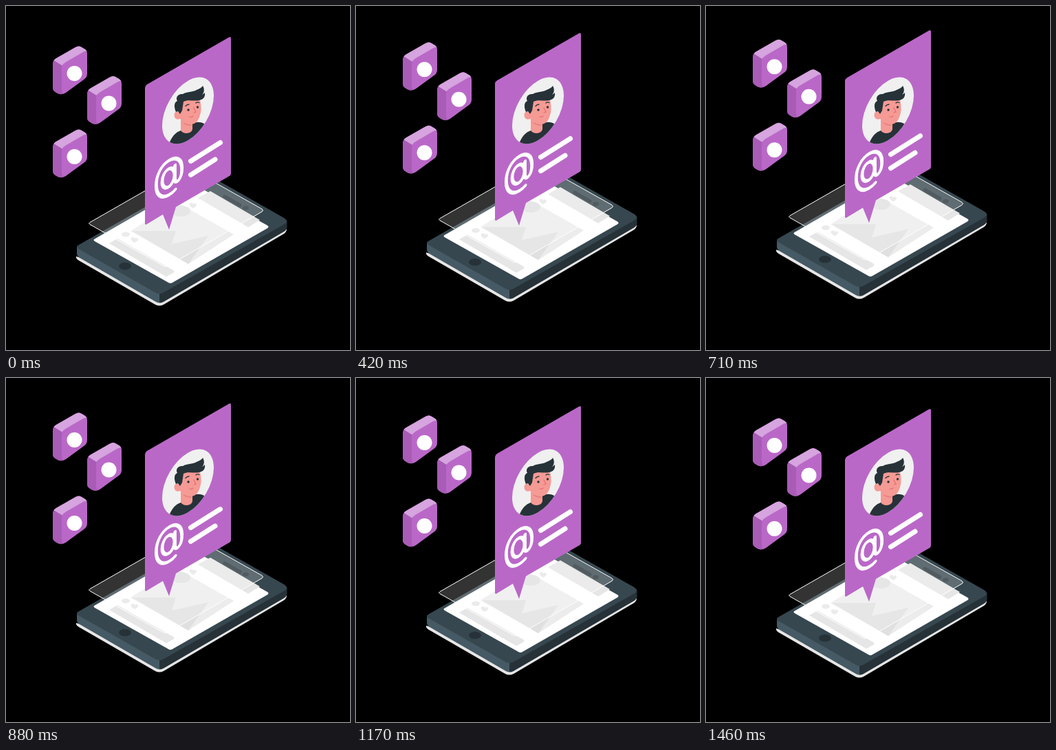
Animation, 500 px wide and 500 px high, one loop 1500 ms. Source, as an HTML page:

```html
<!DOCTYPE html>
<html lang="en">
<head>
<meta charset="utf-8">
<style>
  html, body { margin: 0; width: 100%; height: 100%; overflow: hidden; background: #000; }
  svg { display: block; width: 100vw; height: 100vh; }
</style>
</head>
<body>
<svg viewBox="0 0 500 500">
  <defs>
    <g id="tile">
      <path fill="#ba68c8" d="M68 85Q68 79 73 76L101 60Q106 57 110 60L115 63Q118 65 118 70V98Q118 104 113 107L87 126Q81 130 75 127L71 124.500Q68 122.500 68 118Z"/>
      <path fill="#a85cb6" d="M68 85Q68 81 70 78.500L82 85.500Q81 88 81 91V122Q81 126 83.500 127.500Q79 129 75 127L71 124.500Q68 122.500 68 118Z"/>
      <path fill="#d6a4de" d="M69.500 79Q71 77 73 76L101 60Q106 57 110 60L115 63Q117 64.500 117.500 66.500Q115.500 65 112 67L87 81.500Q83 84 81.500 86.500Z"/>
      <circle cx="99.500" cy="98" r="11" fill="#fff"/>
    </g>
    <path id="heart" d="M0 4C-5 1-6-1-5-3C-3-5 0-4 0-2C2-4 5-3 5-1C5 1 2 3 0 4Z"/>
    <clipPath id="portrait"><circle r="43.300" transform="matrix(.866 -.5 0 1 264.500 152)"/></clipPath>
  </defs>

  <g id="float">
    <use href="#tile"/>
    <use href="#tile" x="50" y="43.500"/>
    <use href="#tile" y="121"/>

    <!-- phone -->
    <path fill="#e6e6e6" d="M102 364Q101 367 106 370L217 434Q223 437 229 434L404 331Q408 328 408 324L223 400Z"/>
    <path fill="#455a64" d="M103 350V360Q103 363 107 366L217 429.500Q220 431.500 223 431.500V417Z"/>
    <path fill="#263238" d="M223 417V431.500Q226 431.500 229 430L404 328Q408.500 325 408.500 321V312Z"/>
    <path fill="#37474f" d="M107 346.500L285 245Q289 243 293 245L404 308Q412 313 404 317.500L229 416.500Q223 420 217 416.500L107 354Q99 350 107 346.500Z"/>
    <ellipse cx="173" cy="378" rx="9" ry="5.200" fill="#263238"/>
    <path stroke="#263238" stroke-width="5" stroke-linecap="round" d="M318 277L340 289.500"/>
    <ellipse cx="348.500" cy="293.500" rx="4.500" ry="3" fill="#263238"/>

    <!-- screen -->
    <path fill="#fff" d="M129 338.500L267 259Q270 257 273 259L380 319Q383 321 380 323L242 402Q239 404 236 402L129 342Q126 340 129 338.500Z"/>
    <g fill="#e6e6e6">
      <path d="M150 345L162 338L243 384Q246 386 243 388L233 393.500Z"/>
      <path d="M279 279L297 269L369 311L352 321.500Z"/>
      <path fill="#ececec" d="M181 327L248 285L331 332L265 375Z"/>
      <path fill="#e0e0e0" d="M183 327L247 327L241 346L294 334L265 375Z"/>
      <ellipse cx="254" cy="298" rx="14" ry="8" fill="#e0e0e0"/>
      <ellipse cx="174" cy="332" rx="6" ry="3.500"/>
      <use href="#heart" x="187" y="340"/>
      <use href="#heart" x="272" y="290"/>
    </g>
    <path fill="#fff" fill-opacity=".2" stroke="#fff" stroke-width="1" d="M122 314.500L260 235.500Q263 234 266 235.500L372 295Q375 297 372 299L236 377.500Q232 380 228 377.500L122 317.500Q119 316 122 314.500Z"/>

    <!-- card -->
    <path fill="#ba68c8" d="M202 119Q202 116 205 114L324 45.500Q327 44 327 47V243Q327 246 324 247.500L247 292L237 325L228 303L204 317.500Q202 318.500 202 316Z"/>
    <g fill="none" stroke="#fff" stroke-linecap="round">
      <g transform="matrix(1 -.577 0 1 237 249.500)" stroke-width="4.800">
        <ellipse cx="-1" rx="9" ry="13"/>
        <path d="M8.500-13V7C8.500 16 18.700 14 18.700-2C18.700-16 11-25 0-25C-11-25-18.700-14-18.700 0C-18.700 15-11 25 0 25C4 25 7 24 9 22.500"/>
      </g>
      <path stroke-width="7" d="M268.500 225.500L311.500 198.500M268.500 245.500L304 223"/>
    </g>
  </g>

  <g clip-path="url(#portrait)">
    <path fill="#f0f0f0" d="M220 100H310V205H220Z"/>
    <path fill="#263238" d="M236 204C240 190 246 184 254 181L271 171C277 168 282 168 288 171V205Z"/>
    <path fill="#f59a95" d="M254 165L271 168V179C270 186 258 187 254 181Z"/>
    <path fill="#e8837f" d="M256 169L271 173Q264 176 256 169Z"/>
    <path fill="#f59a95" d="M254 138C262 130 276 129 281 134C285 145 284 156 280 164C276 172 270 173 263 171C258 169 254 165 253 164C247 167 243 161 245 156C247 152 251 153 254 156Z"/>
    <path fill="#263238" d="M247 154C244 147 244 140 249 138C246 133 250 127 257 128C263 124 270 126 277 122C282 120 285 118 286 116C289 121 288 126 285 129Q287 128 289 126C290 133 286 136 281 137C273 139 265 135 258 139L256 152L253 157L250 153Z"/>
    <g fill="#263238"><circle cx="265" cy="151" r="1.700"/><circle cx="278.500" cy="147" r="1.700"/></g>
    <g fill="none" stroke-linecap="round" stroke-width="1.300">
      <path stroke="#263238" d="M261 145.500Q263 143 266 143M276 141Q278 139 281 140.500"/>
      <path stroke="#e8716f" d="M273 148L276 154L273 155M267 161Q270 162 272 160"/>
    </g>
  </g>
</svg>
<script>
  const LOOP = 1500, TRAVEL = 1460, RISE = 10;
  const float = document.getElementById('float');

  function draw(now) {
    const progress = Math.min((now % LOOP) / TRAVEL, 1);
    const lift = RISE * (1 - Math.abs(1 - 2 * progress));
    float.setAttribute('transform', `translate(0 ${-lift})`);
    requestAnimationFrame(draw);
  }
  requestAnimationFrame(draw);
</script>
</body>
</html>
```
